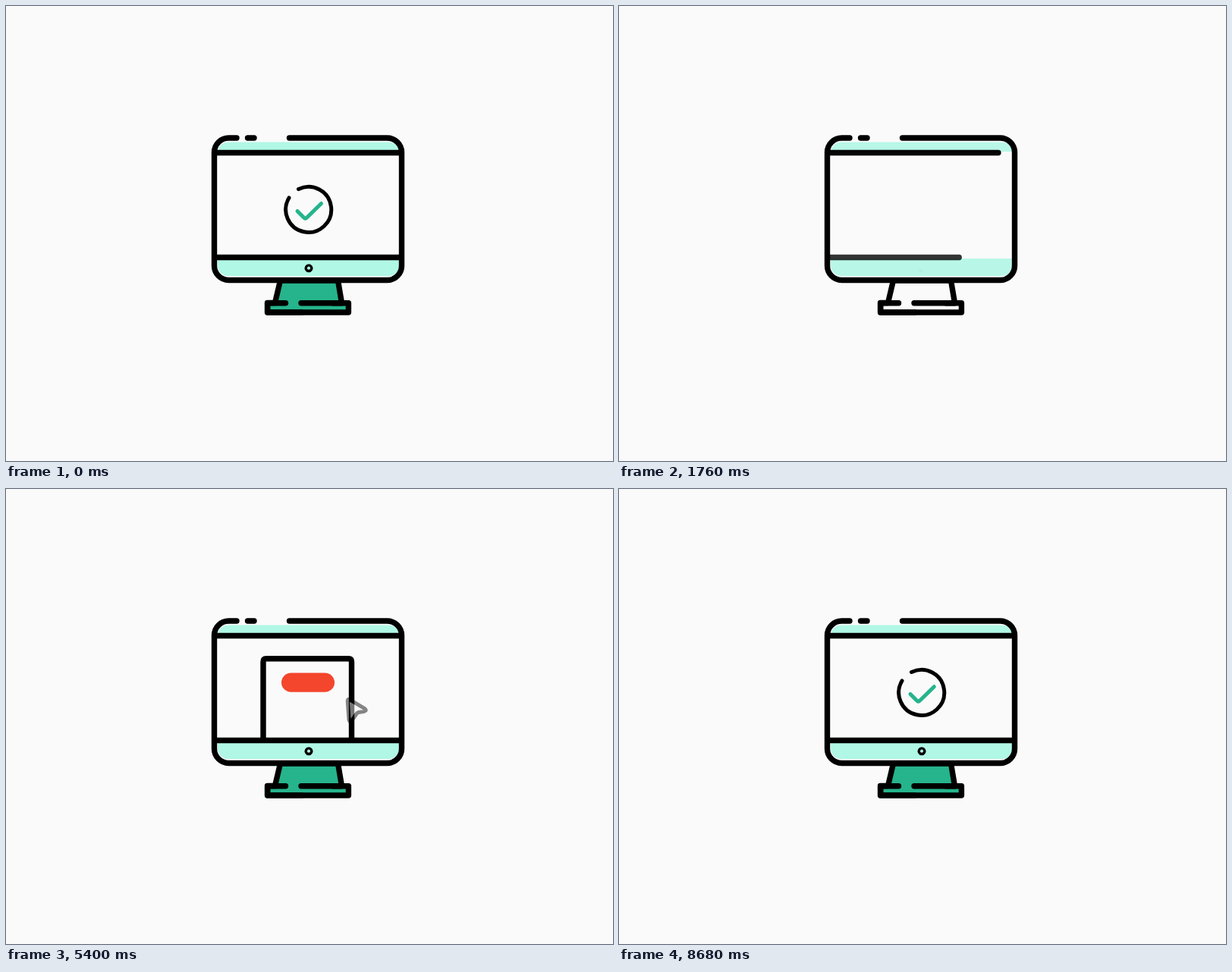
An HTML page for the animation above (9 s loop, 800 by 600 pixels).

```html
<!DOCTYPE html>
<html lang="en">
<head>
<meta charset="utf-8">
<title>Monitor</title>
<style>
html, body { margin: 0; width: 100%; height: 100%; overflow: hidden; background: #fafafa; }
svg { display: block; width: 800px; height: 600px; }
.line, .fixed { fill: none; stroke: #000; stroke-width: 7.4; stroke-linecap: round; stroke-linejoin: round; }
</style>
</head>
<body>
<!-- data-at: start and duration in ms -->
<svg viewBox="0 0 800 600">
  <defs>
    <clipPath id="inner"><rect x="279" y="179.5" width="239.5" height="176.5" rx="14"/></clipPath>
    <clipPath id="screen"><rect x="278" y="197" width="240" height="134"/></clipPath>
  </defs>
  <g id="all">
    <g class="fade" data-at="1160 760" clip-path="url(#inner)" fill="#b0f7e5">
      <rect x="278" y="179" width="242" height="13"/>
      <rect x="278" y="333" width="242" height="24"/>
    </g>
    <path class="fade" data-at="2040 840" fill="#26b48c" d="M362 362H437.5L442.5 391.5H451.5V404H344.5V391.5H354.5Z"/>
    <g clip-path="url(#screen)">
      <g id="page">
        <path class="fixed" d="M339 345V228Q339 223.8 343 223.8H451.5Q455.5 223.8 455.5 228V345"/>
        <rect x="363" y="242.5" width="70" height="25.3" rx="12.65" fill="#f4452d"/>
      </g>
    </g>
    <path class="line" data-at="1000 920" d="M278 193.5H519"/>
    <path class="line" data-at="1171 920" d="M278 331.5H519"/>
    <path class="line" data-at="1576 920" style="stroke-width:3.4" d="M399 349.5a3.8 3.8 0 1 1 .01 0"/>
    <path class="line" data-at="490 920" d="M361.5 362L354.5 391.5H344.5V404H390"/>
    <path class="line" data-at="440 920" d="M431 391.7H442.5L437.5 362H365"/>
    <path class="line" data-at="487 920" d="M368.5 391.7H344.7V404H451.4V391.7H389"/>
    <path class="line" data-at="200 920" d="M304 174H293.5A19 19 0 0 0 274.5 193V342.5A19 19 0 0 0 293.5 361.5H502.5A19 19 0 0 0 521.5 342.5V193A19 19 0 0 0 502.5 174H373.5"/>
    <path class="line" data-at="416 920" d="M318.5 174H327"/>
    <path class="line" data-at="7760 800" style="stroke-width:5" d="M385.5 241.5A30 30 0 1 1 373 253"/>
    <path class="line" data-at="7880 840" style="stroke-width:5;stroke:#26b48c" d="M384 270.5L392.5 279Q394.5 281 396.5 279L415.5 260.5"/>
    <g id="ripple" class="fixed" style="stroke-width:4">
      <path pathLength="1" d="M401.5 270.5A17 17 0 0 1 404.5 243.5"/>
      <path pathLength="1" d="M429 255A17 17 0 0 0 404.5 243.5"/>
    </g>
    <path id="cursor" class="fixed" style="stroke-width:5;fill:#fafafa" d="M412.8 260Q413 257 415.5 258.5L435.5 270.5Q438.5 273 435 274L427.5 275.2Q425.5 275.8 424 278L418.5 286Q415.5 289 414.6 285Z"/>
  </g>
</svg>
<script>
const $ = id => document.getElementById(id);
const LOOP = 9000;
const smooth = x => x * x * (3 - 2 * x);
const ramp = (t, start, dur) => smooth(Math.min(1, Math.max(0, (t - start) / dur)));

const timed = [...document.querySelectorAll('[data-at]')].map(el => {
  const [start, dur] = el.dataset.at.split(' ').map(Number);
  const isLine = el.classList.contains('line');
  if (isLine) el.setAttribute('pathLength', 1);
  return { el, start, dur, isLine };
});
const arcs = [...$('ripple').children];

function draw(t) {
  if (t < 40) t = LOOP;
  $('all').style.display = t < 200 ? 'none' : '';

  for (const { el, start, dur, isLine } of timed) {
    const p = ramp(t, start, dur);
    el.setAttribute('opacity', isLine ? smooth(p) : p);
    if (isLine) el.setAttribute('stroke-dasharray', p < 1 ? `${p} 2` : 'none');
  }

  const hidden = 1 - ramp(t, 2960, 840) + ramp(t, 6840, 840);
  $('page').setAttribute('transform', `translate(0 ${hidden * 116})`);

  // The cursor enters from the lower right, presses, and leaves the same way.
  const away = 1 - ramp(t, 5000, 840) + ramp(t, 6840, 640);
  const press = 1 - 0.14 * (ramp(t, 6080, 200) - ramp(t, 6280, 200));
  $('cursor').setAttribute('transform',
    `translate(${away * 70} ${away * 36}) translate(413 258) scale(${press}) translate(-413 -258)`);
  $('cursor').setAttribute('opacity', 1 - away);

  // Arcs grow from both ends, then shrink to their meeting point.
  const head = ramp(t, 6440, 260), tail = ramp(t, 6600, 240);
  $('ripple').setAttribute('opacity', head > tail ? 1 : 0);
  for (const arc of arcs) arc.setAttribute('stroke-dasharray', `0 ${tail} ${head - tail} 2`);
  if (tail === 0) for (const arc of arcs) arc.setAttribute('stroke-dasharray', `${head} 2`);
}

const began = performance.now();
function tick() {
  draw((performance.now() - began) % LOOP);
  requestAnimationFrame(tick);
}
draw(0);
requestAnimationFrame(tick);
</script>
</body>
</html>
```
